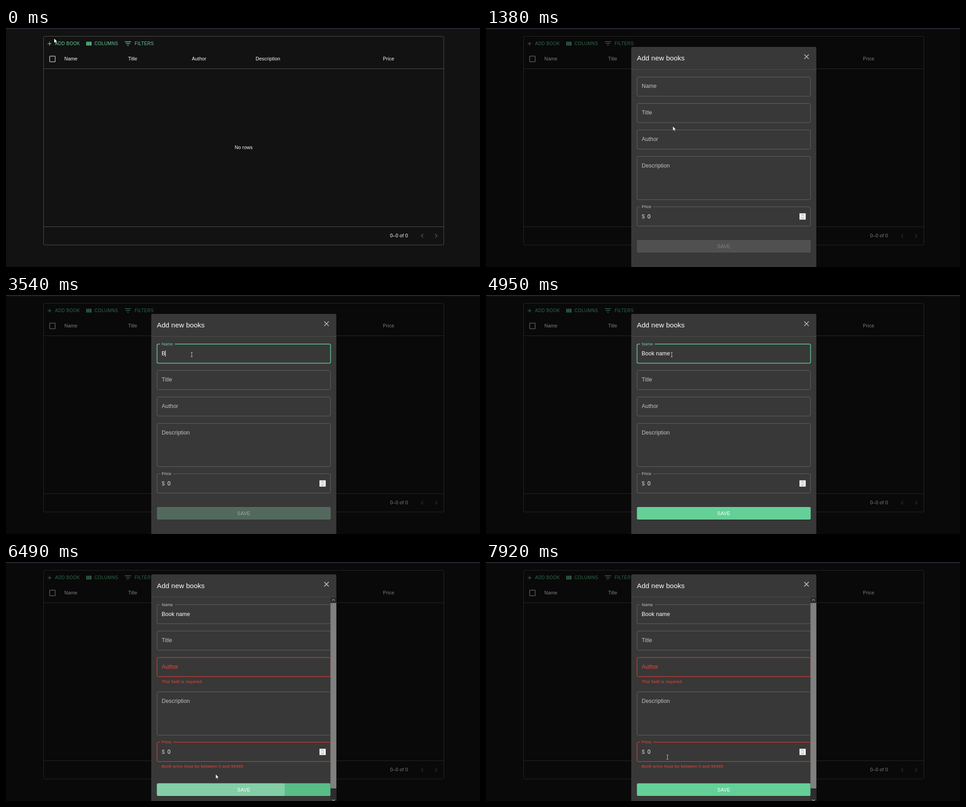
An HTML page for the animation above (8 s loop, 1054x531 px).

```html
<!DOCTYPE html>
<html lang="en">
<head>
<meta charset="utf-8">
<title>Add book dialog</title>
<style>
  html, body { margin: 0; width: 100%; height: 100%; overflow: hidden; background: #121212; }
  svg { display: block; width: 100%; height: 100%; }
  text { font-family: "Liberation Sans", Arial, sans-serif; white-space: pre; }
</style>
</head>
<body>
<svg id="stage" viewBox="0 0 1054 531"></svg>
<script>
const LOOP = 8000;
const GREEN = '#64d097', RED = '#f44336', PAPER = '#383838';
const OPEN = 590, FOCUS = 2270, TYPED = 4940, PRESS = 6290, INVALID = 6400;
const KEYS = [3470, 3620, 3770, 4000, 4290, 4420, 4560, 4700, 4890];
const CLICKS = [[480, 600], [2210, 2330], [6280, 6400]];
const HELPER_H = 17.6;

// Pointer stops: time, x, y
const PATH = [
  [70, 107, 23], [180, 110, 15], [430, 123.5, 32], [900, 123.5, 32],
  [1420, 420, 221], [1640, 430, 208], [1710, 430, 208], [2080, 413, 132.5],
  [5480, 413, 132.5], [6000, 467, 482.5], [6400, 467, 482.5],
  [6900, 457, 354], [7160, 457, 354], [7480, 436, 190], [7920, 403.5, 433.5]
];

const FIELDS = [
  { label: 'Name', y: 109, h: 42.5, notch: 32.8 },
  { label: 'Title', y: 167.7, h: 42.5 },
  { label: 'Author', y: 226.5, h: 42.5, error: 'This field is required' },
  { label: 'Description', y: 285.3, h: 96 },
  { label: 'Price', y: 397.2, h: 42.8, notch: 29, error: 'Book price must be between 0 and 99999' }
];

const CURSORS = {
  arrow: '<path d="M0 0v10.4l2.4-2.2 1.6 3.6 1.7-.8-1.6-3.5h3.3z" fill="#fff" stroke="#000" stroke-width=".6"/>',
  hand: '<path d="M-1.3 1q1.3-1.9 2.6 0v4l4 1q1.4.5 1.2 2l-1 5.5h-5.6l-3.6-5q.1-1.7 2.4.1z" fill="#fff" stroke="#111" stroke-width=".9"/>' +
        '<path d="M1.4 8.5v3M3.3 8.5v3" stroke="#555" stroke-width=".6"/>',
  beam: '<path d="M-2-5H-.6L0-4.5.6-5H2M0-4.5v9M-2 5H-.6L0 4.5.6 5H2" fill="none" stroke="#ddd" stroke-width=".9"/>'
};

const ruler = document.createElement('canvas').getContext('2d');
ruler.font = '12.27px "Liberation Sans", Arial, sans-serif';

const clamp = x => Math.max(0, Math.min(1, x));
const smooth = x => x * x * (3 - 2 * x);
const easeOut = x => 1 - (1 - x) ** 2;
const ramp = (t, start, length) => smooth(clamp((t - start) / length));
const lerp = (a, b, k) => a + (b - a) * k;

const text = (x, y, size, str, fill = '#fff', spacing = 0, more = '') =>
  `<text x="${x}" y="${y}" font-size="${size}" fill="${fill}" letter-spacing="${spacing}" ${more}>${str}</text>`;
const rect = (x, y, w, h, fill, more = '') =>
  `<rect x="${x}" y="${y}" width="${w}" height="${h}" fill="${fill}" ${more}/>`;
const line = (d, stroke, width = 1) =>
  `<path d="${d}" fill="none" stroke="${stroke}" stroke-width="${width}"/>`;

function pointerAt(t) {
  const i = PATH.findIndex(p => p[0] > t);
  if (i === 0) return PATH[0].slice(1);
  if (i < 0) return PATH.at(-1).slice(1);
  const [t0, x0, y0] = PATH[i - 1], [t1, x1, y1] = PATH[i];
  const k = smooth((t - t0) / (t1 - t0));
  return [lerp(x0, x1, k), lerp(y0, y1, k)];
}

// Press ripple that grows from (x, y) and fades once released
function ripple(t, down, up, x, y, radius, color, clip) {
  if (t < down || t > up + 550) return '';
  const r = radius * easeOut(clamp((t - down) / 550));
  const alpha = .27 * clamp((t - down) / 100) * (1 - ramp(t, up, 550));
  return `<g clip-path="url(#${clip})"><circle cx="${x}" cy="${y}" r="${r}" fill="${color}" opacity="${alpha}"/></g>`;
}

function grid(t) {
  const heads = [['Name', 0], ['Title', 1], ['Author', 2], ['Description', 3], ['Price', 5]];
  const hover = ramp(t, 290, 200) - ramp(t, 620, 250);
  return rect(83.5, 18.5, 890, 463.5, 'none', 'rx="3" stroke="#515151"') +
    line('M84 90.5H973M84 441.5H973', '#515151') +
    rect(88, 23.5, 81, 23, GREEN, `rx="3" opacity="${.08 * hover}"`) +
    ripple(t, 480, 620, 123.5, 32, 47, GREEN, 'addClip') +
    line('M92.5 34.8h8.6M96.8 30.5v8.6', GREEN, 1.3) +
    [178.7, 182.8, 186.9].map(x => rect(x, 30.4, 3, 8.6, GREEN)).join('') +
    line('M264.3 30.6h13.8M266.6 34.5h9.2M269.7 38.4h3', GREEN, 1.5) +
    [['ADD BOOK', 109], ['COLUMNS', 196.8], ['FILTERS', 286]]
      .map(([s, x]) => text(x, 38.2, 10, s, GREEN, .35)).join('') +
    rect(97.1, 62.6, 12.3, 12.3, 'none', 'rx="1" stroke="#b8b8b8" stroke-width="1.5"') +
    heads.map(([s, col]) => text(129.8 + 141.7 * col, 72.4, 10.74, s, '#fff', .115)).join('') +
    text(528.5, 269.4, 10.74, 'No rows', '#fff', .115, 'text-anchor="middle"') +
    text(854, 464.8, 10.74, '0–0 of 0', '#fff', .115) +
    line('M927.6 457.5l-4 4 4 4M954.4 457.5l4 4-4 4', '#5c5c5c', 1.4);
}

function nameValue(t, y, focused) {
  const value = 'Book name'.slice(0, KEYS.filter(k => k <= t).length);
  const typing = t >= 3330 && t < TYPED;
  const blinkOn = Math.floor((t - FOCUS) / 530) % 2 === 0;
  const caretX = Math.round(346 + ruler.measureText(value).width + value.length * .115);
  return text(346, y + 25, 12.27, value, '#fff', .115) +
    (focused && (typing || blinkOn) ? rect(caretX, y + 14, 1, 14, '#fff') : '');
}

function priceValue(y) {
  return text(346.2, y + 25.8, 12.27, '$', '#c3c3c3') + text(359, y + 25.8, 12.27, '0') +
    rect(697, y + 14.5, 14, 14, '#efefef') +
    line(`M701.5 ${y + 19.4}l2.5-2.4 2.5 2.4M701.5 ${y + 23.6}l2.5 2.4 2.5-2.4`, '#777', 1) +
    line(`M697 ${y + 21.5}h14`, '#d8d8d8', .7);
}

function drawField(f, t, y, hovered) {
  const isName = f.label === 'Name', isPrice = f.label === 'Price';
  const focused = isName && t >= FOCUS && t < PRESS;
  const bad = f.error && t >= INVALID;
  const float = isPrice ? 1 : isName ? easeOut(clamp((t - FOCUS) / 250)) : 0;
  const accent = bad ? RED : focused ? GREEN : null;
  const border = accent || (hovered ? '#fff' : '#666');
  const size = lerp(12.27, 9.2, float);
  return rect(335.8, y, 385.8, f.h, 'none', `rx="3" stroke="${border}" stroke-width="${focused ? 1.5 : 1}"`) +
    (float ? line(`M342.5 ${y}h${f.notch * float}`, PAPER, 3) : '') +
    text(346.2, y + lerp(24.4, 2.9, float), size, f.label, accent || '#c3c3c3', size * .0094) +
    (bad ? text(346.2, y + f.h + 14, 9.2, f.error, RED, .307) : '') +
    (isName ? nameValue(t, y, focused) : isPrice ? priceValue(y) : '');
}

function saveButton(t, y) {
  const on = ramp(t, KEYS[0], 250);
  const hover = ramp(t, 5930, 200) - ramp(t, INVALID, 250);
  const bar = (fill, opacity) => rect(335.6, y, 386.4, 28, fill, `rx="3" opacity="${opacity}"`);
  return rect(335.6, y + 1.5, 386.4, 28, '#000', `rx="3" opacity="${.25 * on}"`) +
    bar('#505050', 1) + bar(GREEN, on) + bar('#55b583', hover) +
    `<clipPath id="saveClip">${rect(335.6, y, 386.4, 28, '#000', 'rx="3"')}</clipPath>` +
    ripple(t, PRESS, INVALID, 467, y + 12, 256, '#fff', 'saveClip') +
    text(528.8, y + 17.9, 10.74, 'SAVE', '#fff', .3, `text-anchor="middle" opacity="${.3 + .7 * on}"`);
}

const scrollbar = rect(721.5, 78, 13, 453, '#2c2c2c') + rect(721.5, 91, 13, 412, '#808080') +
  line('M724.8 86l3.2-3.2 3.2 3.2M724.8 527.5l3.2 3.2 3.2-3.2', '#909090', 1.4);

// Error lines push the fields below them down
function layout(t) {
  const invalid = t >= INVALID;
  const top = invalid ? -14.4 : 0;
  let shift = top;
  const ys = FIELDS.map(f => {
    const y = f.y + shift;
    if (invalid && f.error) shift += HELPER_H;
    return y;
  });
  return { invalid, top, ys, saveY: 471 + shift };
}

function dialog(t, { invalid, top, ys, saveY }, hovered) {
  return rect(323, 42 + top, 411.5, 520, PAPER, 'rx="3"') +
    text(335.6, 72.4 + top, 15.34, 'Add new books', '#fff', .115) +
    line(`M707.7 ${58.8 + top}l10 10m0-10l-10 10`, '#c3c3c3', 1.5) +
    line(`M323 ${92.2 + top}H734.5`, '#505050') +
    FIELDS.map((f, i) => drawField(f, t, ys[i], i === hovered)).join('') +
    saveButton(t, saveY) + (invalid ? scrollbar : '');
}

const stage = document.getElementById('stage');

function draw(t) {
  const place = layout(t), [px, py] = pointerAt(t);
  const within = (x0, x1, y, h) => px >= x0 && px <= x1 && py >= y && py <= y + h;
  const shown = ramp(t, OPEN, 240);
  const hovered = t > OPEN ? FIELDS.findIndex((f, i) => within(336, 722, place.ys[i], f.h)) : -1;
  const onButton = t < OPEN ? within(88, 169, 23.5, 23)
    : t > KEYS[0] && within(336, 722, place.saveY, 28);
  const cursor = hovered >= 0 ? 'beam' : onButton ? 'hand' : 'arrow';
  const clicking = CLICKS.some(([a, b]) => t >= a && t < b);

  stage.innerHTML =
    `<clipPath id="addClip">${rect(88, 23.5, 81, 23, '#000', 'rx="3"')}</clipPath>` +
    rect(0, 0, 1054, 531, '#121212') + grid(t) +
    rect(0, 0, 1054, 531, '#000', `opacity="${shown / 2}"`) +
    `<g opacity="${shown}">${dialog(t, place, hovered)}</g>` +
    rect(0, 0, 1054, 2.4, '#282832') +
    `<g transform="translate(${px} ${py})">` +
    (clicking ? '<circle cx="-1" r="9.5" fill="#ff0" opacity=".5"/>' : '') + CURSORS[cursor] + '</g>';
}

const start = performance.now();
function tick() {
  draw((performance.now() - start) % LOOP);
  requestAnimationFrame(tick);
}
tick();
</script>
</body>
</html>
```
